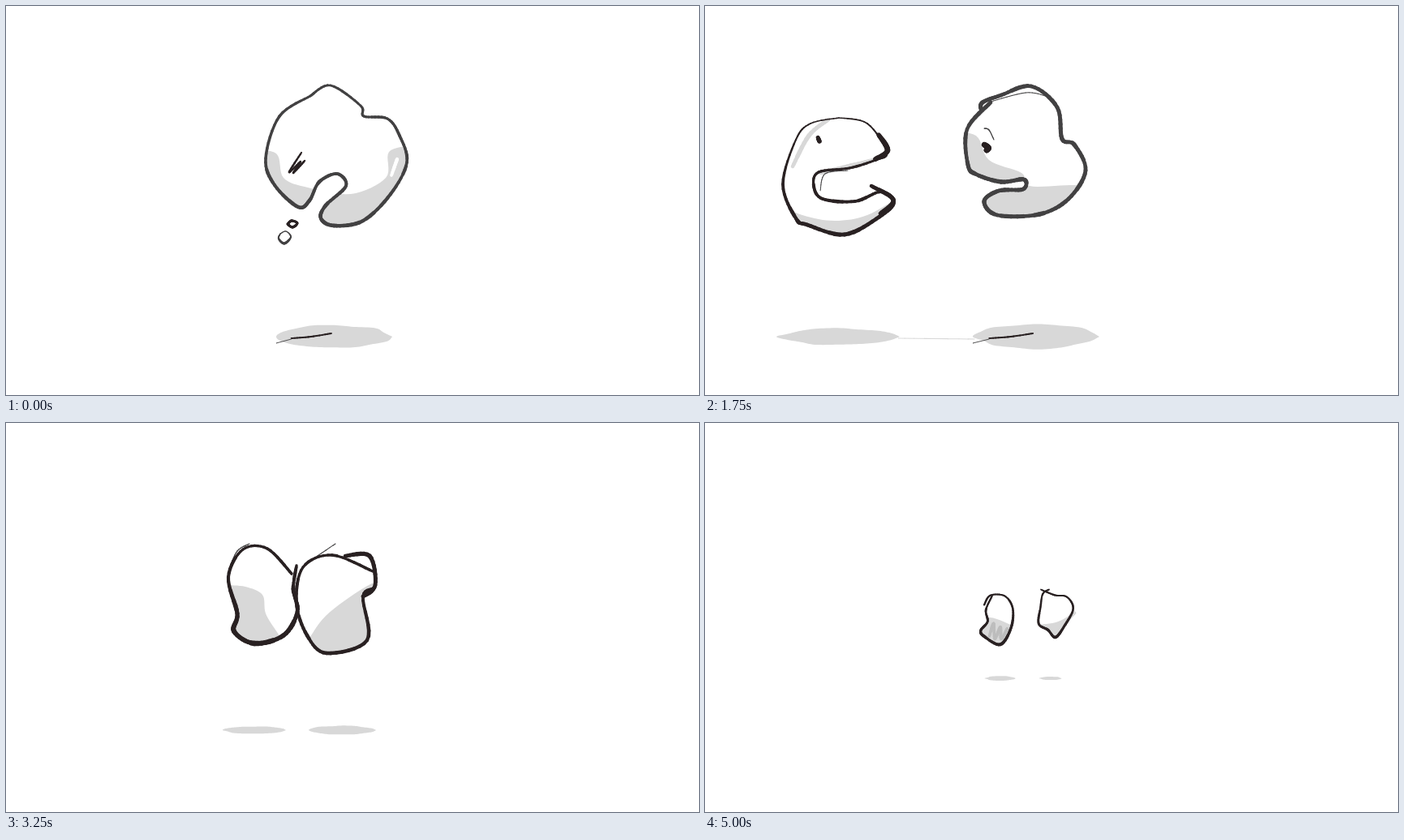
An HTML page with a canvas for the animation above (5250 ms loop, 854 by 480 pixels).

```html
<!DOCTYPE html>
<html lang="en">
<head>
<meta charset="utf-8">
<title>Two heads</title>
<style>
html, body { margin: 0; width: 100%; height: 100%; overflow: hidden; background: #fff; }
canvas { display: block; }
</style>
</head>
<body>
<canvas id="stage" width="854" height="480"></canvas>
<script>
const ctx = document.getElementById('stage').getContext('2d');
const STEP = 250, BEATS = 21;
const INK = { k: '#292122', s: '#424142', g: '#d8d8d8', m: '#bdbdbd', w: '#fff' };

// outline: key points of the pen line; pen: its weight at the top and bottom of the head;
// shade: upper edge of the grey; marks: ink, width and points; shadow: left, right, half height.
const looks = {
  split: {
    outline: '375,111 337,136 320,188 331,221 360,248 374,240 386,217 408,207 419,222 394,246 388,262 404,271 440,265 474,232 494,193 485,160 470,139 441,136 437,123 400,98 375,111',
    ink: 's', pen: [2.8, 4.6], shade: '300,178 333,182 342,212 372,224 425,232 468,212 472,180 500,172',
    marks: ['k2.4 364,181 349,205 363,192 354,206 368,191', 'w4 475,209 482,189'], shadow: [333, 476, 15]
  },
  bubbles: {
    outline: '338,281 345,278 351,285 343,293 336,287 338,281', ink: 's', pen: [1, 3],
    marks: ['k3 347,269 352,265 359,268 353,273 347,269']
  },
  talker: {
    outline: '172,170 208,176 234,198 222,214 180,231 165,255 182,281 212,273 238,250 255,261 240,282 203,314 160,311 136,294 117,280 115,240 130,195 172,170',
    pen: [1.6, 6], shade: '100,236 140,256 160,262 178,226 220,206 260,206',
    marks: ['k6 229,192 234,202 226,211', 'k5 222,246 249,252 253,266', 'k7 148,203 148,206', 'w2 156,280 188,292 215,277'],
    shadow: [100, 257, 11]
  },
  shouter: {
    outline: '165,138 200,145 224,180 210,190 178,200 140,205 134,222 145,238 185,241 217,229 233,242 215,260 172,282 126,270 112,262 96,220 112,165 130,145 165,138',
    pen: [1.6, 5], shade: '80,240 120,258 160,265 200,258 240,235',
    marks: ['g5 108,198 128,160 152,140', 'g5 143,206 180,197 212,189', 'k6 214,159 225,178 210,189', 'k5 205,222 232,239 216,256', 'k5 139,162 141,167', 's1 142,228 148,207 176,203'],
    shadow: [88, 240, 11]
  },
  listener: {
    outline: '340,128 342,119 365,110 402,99 434,125 440,164 455,171 469,203 448,238 412,257 360,258 344,241 362,228 392,226 393,214 365,217 335,208 324,196 323,152 352,119',
    ink: 's', pen: [4.8, 5], shade: '300,155 334,160 350,190 390,206 400,222 450,221 480,222',
    marks: ['k7 344,171 349,175 347,178', 's1 352,118 395,107 420,111', 'g1 238,410 332,411'], shadow: [330, 486, 16]
  },
  leftBall: {
    outline: '228,135 262,154 293,176 301,198 286,227 273,231 285,243 262,261 215,254 186,227 187,190 196,165 222,142 244,152 240,164',
    pen: [2.2, 4.8], shade: '180,178 202,180 211,208 242,235 300,240',
    marks: ['k2.6 281,176 295,174', 'g3 287,227 316,221', 's1.4 286,193 292,191', 's.8 220,190 235,174'], shadow: [182, 286, 8]
  },
  rightBall: {
    outline: '398,132 392,121 428,114 460,132 467,155 475,195 460,233 404,255 382,245 384,228 396,212 378,209 363,219 352,192 357,155 396,122',
    pen: [2.6, 4], shade: '340,207 362,196 384,198 390,238 425,222 446,200 448,150 480,138',
    marks: ['k3.2 356,162 370,165', 'k4 362,179 363,180', 'k2.8 380,244 402,246'], shadow: [370, 476, 6]
  },
  leftBump: {
    outline: '352,186 322,155 292,156 274,190 285,235 281,257 306,272 342,262 359,233 354,205 358,176',
    pen: [3.2, 6], shade: '270,200 295,202 316,212 320,235 334,258 350,280',
    marks: ['s1.2 275,180 285,158 300,149'], shadow: [267, 345, 5]
  },
  rightBump: {
    outline: '418,164 448,164 455,200 440,214 445,268 395,284 371,262 358,222 366,178 402,163 452,183',
    pen: [3.4, 4.4], shade: '370,272 394,238 440,204 470,190',
    marks: ['k5 418,164 448,164 455,200 440,214', 's1 372,172 406,149'], shadow: [373, 456, 6]
  },
  leftLump: {
    outline: '282,178 296,156 330,157 349,186 345,232 320,271 282,252 274,238 290,217 286,190 301,156',
    pen: [2.8, 5.2], shade: '265,250 290,208 345,225',
    marks: ['m5 294,252 304,222 307,258 320,230 322,258 336,234'], shadow: [283, 356, 6]
  },
  rightLump: {
    outline: '385,163 422,178 455,183 472,215 448,262 424,292 404,272 379,255 384,210 390,175 407,163',
    pen: [2.8, 5], shade: '376,258 430,250 480,222', marks: ['g5 455,248 476,226'], shadow: [380, 441, 5]
  }
};
looks.scowler = { ...looks.listener, marks: [...looks.listener.marks, 's1.2 344,151 350,153 356,165'] };

// Keys: beat, look, shift and scale. A head glides between keys that share a look.
const leftHead = [
  [0, 'bubbles', 0, 0], [1, 'talker', 203, 169, .45], [2, 'talker', 163, 106, .65], [4, 'talker', 0, 0], [5, 'talker', -14, -22],
  [6, 'shouter', -1, 1], [7, 'shouter', 0, 0], [8, 'shouter', 16, 3], [9, 'leftBall', -47, 0], [10, 'leftBall', 0, 0],
  [13, 'leftBump', 0, 0], [15, 'leftBump', -17, -6], [16, 'leftLump', -13, -6], [17, 'leftLump', 0, 0], [20, 'leftLump', 196, 131, .525]
];
const rightHead = [
  [0, 'split', 0, 0], [1, 'split', 0, 2], [2, 'split', 78, 11], [3, 'listener', 4, -8], [4, 'listener', 0, 0], [6, 'scowler', 0, 0],
  [8, 'rightBall', -12, -4], [10, 'rightBall', 0, 0], [12, 'rightBall', 67, 12], [13, 'rightBump', 0, 0], [14, 'rightBump', 8, 0],
  [15, 'rightLump', 3, -5], [16, 'rightLump', 8, 2], [17, 'rightLump', 0, 0], [20, 'rightLump', 238, 131, .457]
];
const floor = [[0, 'floor', 0, 408], [8, 'floor', 0, 408], [10, 'floor', 0, 391], [12, 'floor', 0, 379], [17, 'floor', 0, 379], [20, 'floor', 0, 315]];

const mix = (a, b, u) => a + (b - a) * u;
const noise = n => { const v = Math.sin(n * 127.1) * 43758.5; return v - Math.floor(v); };
const points = text => text.split(' ').map(p => p.split(',').map(Number));
const spline = (a, b, c, d, u) =>
  b + u / 2 * (c - a + u * (2 * a - 5 * b + 4 * c - d + u * (3 * (b - c) + d - a)));

function curve(pts) {
  const at = i => pts[Math.max(0, Math.min(pts.length - 1, i))];
  const out = [];
  for (let i = 0; i < pts.length - 1; i++)
    for (let u = 0; u < 1; u += 1 / 8)
      out.push([0, 1].map(k => spline(at(i - 1)[k], at(i)[k], at(i + 1)[k], at(i + 2)[k], u)));
  return [...out, at(pts.length)];
}

function trace(line) {
  ctx.beginPath();
  line.forEach(p => ctx.lineTo(...p));
}

function stroke(line, ink, widthAt) {
  ctx.strokeStyle = ink;
  for (let i = 1; i < line.length; i++) {
    ctx.lineWidth = widthAt(line[i][1]) * mix(.9, 1.1, noise(i >> 1));
    trace([line[i - 1], line[i]]);
    ctx.stroke();
  }
}

function keyAt(track, beat) {
  const i = track.findLastIndex(key => key[0] <= beat);
  const [from, look, x, y, s = 1] = track[i];
  const [to, nextLook, nx, ny, ns = 1] = track[i + 1] || track[i];
  const u = nextLook === look && to > from ? (beat - from) / (to - from) : 0;
  return { look: looks[look], x: mix(x, nx, u), y: mix(y, ny, u), s: mix(s, ns, u) };
}

function drawShadow({ look, x, s }, y) {
  const [left, right, high] = look.shadow;
  const cx = (left + right) / 2 * s + x, w = (right - left) / 2 * s, h = high * s;
  const rim = Array.from({ length: 17 }, (_, i) => {
    const a = i % 16 * Math.PI / 8, r = mix(.85, 1, noise(i % 16 + left));
    return [cx + w * Math.cos(a) * (i % 8 ? r : 1), y + h * r * Math.sin(a)];
  });
  trace(curve(rim));
  ctx.fillStyle = INK.g;
  ctx.fill();
  if (look.ink === 's') {
    stroke(curve([[cx - .74 * w, y + 2], [cx - .4 * w, y], [cx - .05 * w, y - 4]]), INK.k, () => 2);
    stroke([[cx - w, y + 8], [cx - .74 * w, y + 3]], INK.s, () => 1);
  }
}

function drawHead({ look, x, y, s }) {
  const line = curve(points(look.outline)), heights = line.map(p => p[1]);
  const top = Math.min(...heights), bottom = Math.max(...heights);
  const grow = Math.sqrt(1 / s);   // small heads keep a firm line
  ctx.save();
  ctx.transform(s, 0, 0, s, x, y);
  if (look.shade) {
    const edge = curve(points(look.shade));
    ctx.save();
    trace(line);
    ctx.clip();
    trace([...edge, [edge.at(-1)[0], 480], [edge[0][0], 480]]);
    ctx.fillStyle = INK.g;
    ctx.fill();
    ctx.restore();
  }
  for (const mark of look.marks) {
    const [pen, ...rest] = mark.split(' ');
    stroke(curve(points(rest.join(' '))), INK[pen[0]], () => pen.slice(1) * grow);
  }
  stroke(line, INK[look.ink || 'k'], h => mix(...look.pen, (h - top) / (bottom - top)) * grow);
  ctx.restore();
}

const start = performance.now();
function tick() {
  const beat = Math.floor(Math.max(0, performance.now() - start) / STEP) % BEATS;
  const heads = [leftHead, rightHead].map(track => keyAt(track, beat));
  ctx.clearRect(0, 0, 854, 480);
  ctx.lineCap = ctx.lineJoin = 'round';
  for (const head of heads) {
    if (head.look.shadow) drawShadow(head, keyAt(floor, beat).y);
    drawHead(head);
  }
  requestAnimationFrame(tick);
}
tick();
</script>
</body>
</html>
```
